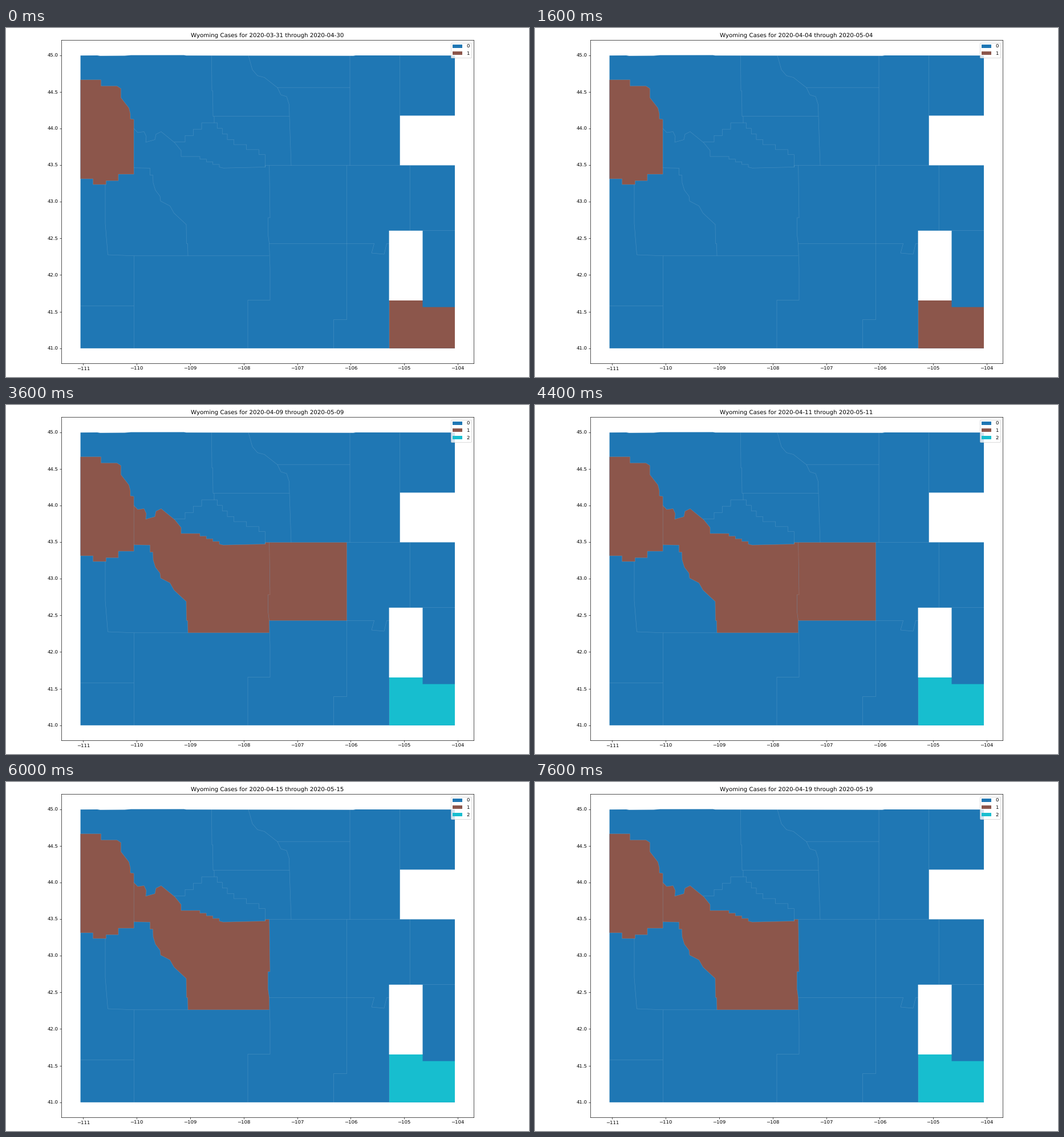
A matplotlib script that plays this animation: 917 by 611 pixels, repeating every 8 s.

```python
import numpy as np
import matplotlib.pyplot as plt
from matplotlib.animation import FuncAnimation
from matplotlib.collections import LineCollection
from matplotlib.patches import Patch, Polygon

W, H, DPI = 917, 611, 61.125
FRAMES, INTERVAL = 20, 400
BLUE, BROWN, CYAN = COLORS = ["#1f77b4", "#8c564b", "#17becf"]
plt.rcParams["text.hinting"] = "none"

# Axes box in stage pixels and its limits in degrees
LEFT, RIGHT, TOP, BOTTOM = 97.3, 820, 21.5, 587
WEST, EAST, SOUTH, NORTH = -111.405, -103.702, 40.7945, 45.2065

# Survey lines shared by many borders, in stage pixels with y down
STATE_W, STATE_E, STATE_N, STATE_S = 130.6, 787, 48.2, 560.8
PARALLEL, SHELF, BASIN = 240.6, 377.4, 398.8
HORN, TETON_E, MID, FRONT, PLAINS = 154.7, 224.2, 597.6, 672, 730.5


def across(y, x0, x1):
    return [(x0, y), (x1, y)]


def down(x, y0, y1):
    return [(x, y0), (x, y1)]


def box(x0, y0, x1, y1):
    return across(y0, x0, x1) + across(y1, x1, x0)


def stairs(start, end, steps):
    """Equal steps, each one vertical first, ending on a vertical."""
    (x0, y0), (x1, y1) = start, end
    xs = np.linspace(x0, x1, steps)
    ys = np.linspace(y0, y1, steps + 1)
    return [(x, y) for i, x in enumerate(xs) for y in ys[i:i + 2]]


# Winding borders, each defined once and reused by the regions it bounds
state_top = [(STATE_W, STATE_N), (160, 48), (165, 48.8), (208, 48.5),
             (219, 47.6), (312, 47.5), (316, STATE_N), (609, 48.7), (613, 48)]
teton_side = [(STATE_W, 90.7), (166.6, 90.7), (166.6, 101.6), (194.5, 101.6),
              (201.5, 106), (201.5, 122), (215.5, 140), (218, 150), (218, 159),
              (TETON_E, 160), (TETON_E, 256)]
teton_foot = [(197, 256), (197, 267.4), (175.5, 267.4), (175.5, 274),
              (152.6, 274), (152.6, 264), (STATE_W, 264)]
crest = [(TETON_E, 176), (231, 183), (242, 181.5), (246, 190), (245, 200),
         (261, 195.5), (263, 186), (272, 181.5), (296, 201), (307, 214.5),
         (307, 225)]
crest += stairs((340, 225), (374, 243.5), 4)
crest += [(381, 245.2), (454.5, 243.5), (454.5, PARALLEL)]
natrona_west = [(461.7, PARALLEL), (463, 332), (459.5, 332), (459.5, 362),
                (461.5, SHELF)]
divide = [(319, BASIN), (318.5, SHELF), (316.5, SHELF), (316, 344),
          (294.5, 324), (287.5, 311.5), (271, 303), (270, 294.5), (262, 284),
          (258, 271), (257.5, 257.6), (252.5, 257.6), (252.5, 245.3),
          (TETON_E, 244.8)]
bighorns = [(425, STATE_N), (432, 73), (441, 83.5), (453, 86.5), (476, 104.5),
            (482, 117), (492, 120), (496.5, 134), (497, HORN),
            (500, PARALLEL)]
hot_springs = [(295, 199.5)] + stairs((314, 199.5), (343, 166), 3)
hot_springs += stairs((370.5, 166), (388, 195.3), 3)
hot_springs += stairs((399.5, 195.3), (443.5, 221.7), 3)
hot_springs += down(454.5, 221.7, 243.5)

seams = [
    teton_side + teton_foot, crest, natrona_west, divide, bighorns, hot_springs,
    [(360.5, STATE_N), (361, 110), (362.5, 110), (363, HORN)],
    across(HORN, 363, 497), down(365, HORN, 166),
    across(104.2, 476, 603), down(603, STATE_N, PARALLEL),
    down(690.6, STATE_N, 153.5), across(PARALLEL, 454.5, 690.6),
    [(174, 274), (174, 342), (178.5, 397), (TETON_E, BASIN), (461.5, BASIN)],
    across(486.6, STATE_W, TETON_E), down(224.7, BASIN, STATE_S),
    [(461.5, SHELF), (463, 420), (463, 476.4), (424, 476.4), (424, STATE_S)],
    across(SHELF, 461.5, 645.5),
    [(645.5, SHELF), (641, 394), (663, 396), (667.5, SHELF), (FRONT, SHELF)],
    down(MID, PARALLEL, 510.5) + down(574.5, 510.5, STATE_S),
    down(708.2, PARALLEL, 354.7), across(354.6, PLAINS, STATE_E),
    down(FRONT, 477, STATE_S),
]


def to_degrees(points):
    x, y = np.array(points, float).T
    lon = WEST + (x - LEFT) / (RIGHT - LEFT) * (EAST - WEST)
    lat = SOUTH + (BOTTOM - y) / (BOTTOM - TOP) * (NORTH - SOUTH)
    return np.column_stack([lon, lat])


def add_region(points, color):
    region = Polygon(to_degrees(points), fc=color, ec="none", lw=0, snap=False)
    return ax.add_patch(region)


# The sliver keeps rounding from dropping a pixel
fig = plt.figure(figsize=((W + 1e-3) / DPI, (H + 1e-3) / DPI), dpi=DPI,
                 facecolor="white")
ax = fig.add_axes([LEFT / W, 1 - BOTTOM / H,
                   (RIGHT - LEFT) / W, (BOTTOM - TOP) / H])
ax.set(xlim=(WEST, EAST), ylim=(SOUTH, NORTH))
ax.set_xticks(range(-111, -103))
ax.set_yticks(np.arange(41, 45.1, 0.5))

add_region(state_top + down(STATE_E, STATE_N, STATE_S)
           + [(STATE_W, STATE_S)], BLUE)
add_region(teton_side + teton_foot, BROWN)
fremont = add_region(crest + natrona_west + [(461.5, BASIN)] + divide, BLUE)
natrona = add_region(natrona_west + down(MID, SHELF, PARALLEL), BLUE)
laramie = add_region(box(FRONT, 477, STATE_E, STATE_S), BROWN)
add_region(box(PLAINS, 470, STATE_E, 488.6), BLUE)

lines = LineCollection([to_degrees(s) for s in seams], colors="white",
                       linewidths=0.7, alpha=0.18, zorder=1.5)
lines.set_snap(False)
ax.add_collection(lines, autolim=False)

# Counties without data stay empty
for gap in (box(690.7, 153.4, STATE_E + 2, 240.4),
            box(671.6, 354.8, PLAINS, 477)):
    add_region(gap, "white").set_zorder(1.6)

title = ax.set_title("", fontsize=12)
keys = [Patch(fc=c, ec="none", label=str(n)) for n, c in enumerate(COLORS)]


def update(frame):
    spread = frame >= 5
    fremont.set_facecolor(BROWN if spread else BLUE)
    natrona.set_facecolor(BROWN if 5 <= frame < 15 else BLUE)
    laramie.set_facecolor(CYAN if spread else BROWN)
    ax.legend(handles=keys[:3 if spread else 2], loc="upper right",
              labelspacing=0.52)
    start = np.datetime64("2020-03-31") + frame
    title.set_text(f"Wyoming Cases for {start} through {start + 30}")
    return []


anim = FuncAnimation(fig, update, frames=FRAMES, interval=INTERVAL,
                     init_func=lambda: update(0), repeat=True, repeat_delay=0)
plt.show()
```
